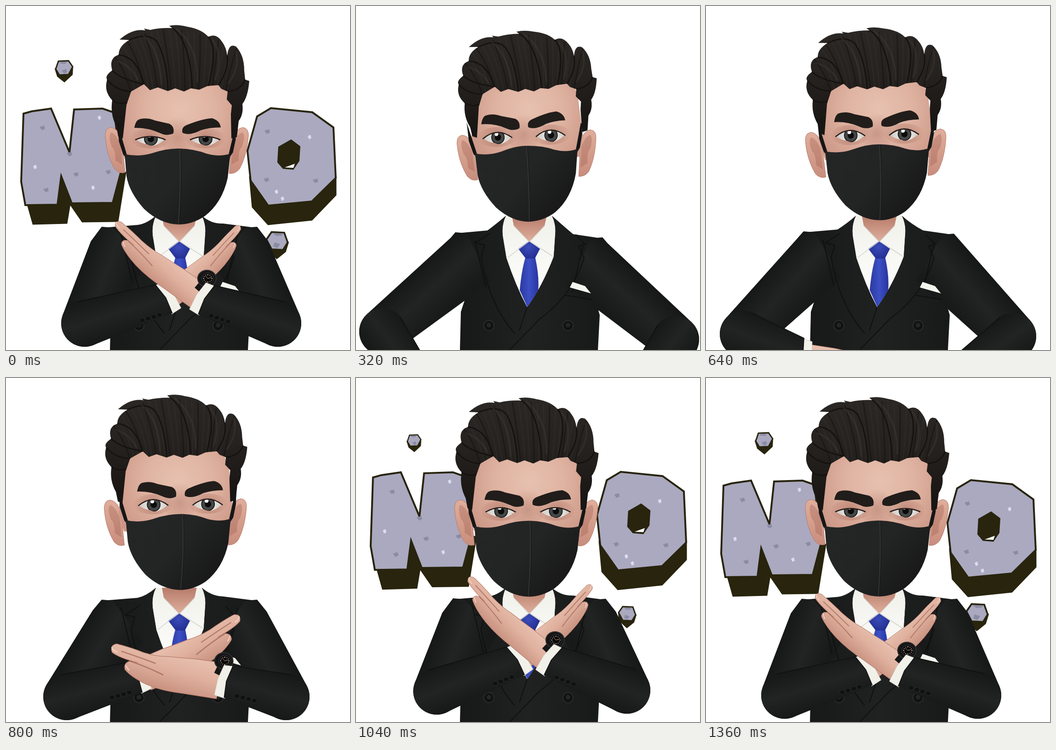
Write an HTML page with a canvas that moves like this. It is 748 by 748 pixels and loops after 1.44 s.

```html
<!DOCTYPE html>
<html lang="en">
<head>
<meta charset="utf-8">
<title>No</title>
<style>
html, body { margin: 0; width: 100%; height: 100%; overflow: hidden; background: #fff; }
canvas { display: block; width: 100vw; height: 100vh; }
</style>
</head>
<body>
<canvas id="stage" width="748" height="748"></canvas>
<script>
const ctx = document.getElementById('stage').getContext('2d');
const FRAME = 80, FRAMES = 18;
const STONE = '#aaa9c0', EARTH = '#28240d', CLOTH = '#1b1c1c', SEAM = '#0f1010';

// Arms: shoulder, elbow, wrist, fingertip, hand width.
// Head: dx, tilt, ear dy, face dx, face dy, hair dy, hair scale, eye opening, brow dy.
const hips = {
  left: [240, 542, 58, 708, 150, 825, 380, 830, 1],
  right: [512, 553, 695, 725, 605, 840, 340, 840, 1],
  head: [0, -2.4, 11, -8, -6, 1, .92, 1, -6]
};
const lift = {
  left: [236, 540, 81, 713, 208, 758, 440, 770, 1],
  right: [515, 545, 667, 718, 545, 800, 300, 800, 1],
  head: [-2, -1.5, 7, 1, -9, -4, .935, 1, -6]
};
const cross = {
  left: [232, 532, 132, 693, 284, 650, 507, 518, 1.2],
  right: [522, 532, 609, 693, 482, 660, 230, 585, 1.3],
  head: [-3, -.6, 0, 9, -14, -12, .95, 1, -5]
};
const raise = {
  left: [238, 528, 180, 672, 352, 592, 515, 422, 1],
  right: [516, 530, 587, 668, 420, 592, 252, 397, 1],
  head: [-3, 0, 1, 4, -1, -2, .985, .9, -1]
};
const rest = {
  left: [232, 530, 171, 690, 345, 636, 508, 478, 1],
  right: [522, 530, 591, 690, 434, 638, 240, 470, 1],
  head: [0, 0, 0, 0, 0, 0, 1, .35, 0]
};
const low = { ...rest, head: [0, 0, 1, 0, 2, 2, 1, .3, 0] };
const poseKeys = [[1, hips], [6, hips], [8, lift], [10, cross], [12, raise], [14, low], [15, low], [17, rest]];

const lerp = (a, b, k) => a + (b - a) * k;

function between(keys, f, mix) {
  let i = 0;
  while (i < keys.length - 2 && f > keys[i + 1][0]) i++;
  const [t0, a] = keys[i], [t1, b] = keys[i + 1];
  return mix(a, b, Math.max(0, Math.min(1, (f - t0) / (t1 - t0))));
}

function mixPose(a, b, k) {
  const pose = {};
  for (const part in a) pose[part] = a[part].map((v, i) => lerp(v, b[part][i], k));
  return pose;
}

function shape(d, fill, stroke, width = 1.5) {
  const path = d instanceof Path2D ? d : new Path2D(d);
  if (fill) { ctx.fillStyle = fill; ctx.fill(path); }
  if (stroke) { ctx.strokeStyle = stroke; ctx.lineWidth = width; ctx.stroke(path); }
}

const poly = (...pts) => 'M' + pts.map(p => p.join()).join('L') + 'Z';

function oval(x, y, rx, ry, fill, stroke, width) {
  const path = new Path2D();
  path.ellipse(x, y, rx, ry, 0, 0, 7);
  shape(path, fill, stroke, width);
}

function withStops(g, colors) {
  colors.forEach((c, i) => g.addColorStop(i / (colors.length - 1), c));
  return g;
}

const linear = (x0, y0, x1, y1, ...colors) => withStops(ctx.createLinearGradient(x0, y0, x1, y1), colors);
const radial = (x, y, r, ...colors) => withStops(ctx.createRadialGradient(x, y, 0, x, y, r), colors);

function group(draw) { ctx.save(); draw(); ctx.restore(); }

function placed(cx, cy, dx, dy, angle, sx, sy, draw) {
  group(() => {
    ctx.translate(cx + dx, cy + dy);
    ctx.rotate(angle * Math.PI / 180);
    ctx.scale(sx, sy);
    ctx.translate(-cx, -cy);
    draw();
  });
}

function chip(x, y, light) {
  const w = light ? 4 : 6;
  shape(poly([x - w, y - 2], [x + w - 2, y - 5], [x + w, y + 2], [x - 1, y + 5]), light ? '#dcdcee' : '#8b8ba2');
}

function letterN() {
  shape('M33 382L59 474L132 472L139 430L166 469L243 468L260 362L120 340Z', EARTH, EARTH, 3);
  shape('M38 234L56 229L98 223L138 318L148 225L210 223L236 232L250 360L232 428L143 429L120 370L112 432L42 433L33 382Z', STONE, EARTH, 4);
  [[79, 265], [203, 243, 1], [138, 322], [63, 350, 1], [152, 366], [222, 361], [87, 400], [189, 395, 1]].forEach(c => chip(...c));
}

function letterO() {
  shape('M530 372L536 437L570 475L665 465L717 411L717 372Z', EARTH, EARTH, 3);
  shape('M546 240L576 222L666 231L712 264L717 374L665 425L570 434L532 380L525 315Z', STONE, EARTH, 4);
  shape('M620 290L640 305L638 337L625 356L602 354L590 340L592 306Z', EARTH);
  shape('M606 351L628 343L625 352Z', '#fff');
  [[568, 273], [660, 285, 1], [566, 378], [673, 380], [588, 404, 1], [601, 419, 1]].forEach(c => chip(...c));
}

function rock(x, y, s, flip) {
  placed(0, 0, x, y, 0, s * flip, s, () => {
    shape('M-19-4L-14 12L1 24L18 8L19-8Z', EARTH, EARTH, 2);
    shape('M-12-21L10-22L19-9L10 8L-10 9L-18-4Z', STONE, EARTH, 3);
    shape('M-10-20L8-20L2-15L-8-16Z', '#8b8ba2');
    chip(1, 1);
  });
}

function stones(f) {
  if (f < 12) return;
  const dy = between([[12, -20], [15, -10], [17, 0]], f, lerp);
  const size = between([[12, .954], [13, 1.01], [14, 1]], f, lerp);
  placed(145, 348, 0, dy, 0, size, size, letterN);
  placed(620, 348, 0, dy, 0, size, size, letterO);
  if (f < 13) return;
  const s = between([[13, .8], [14, 1.2], [15, 1.15], [17, 1]], f, lerp);
  rock(126, 141, s, 1);
  rock(590, 519, s * 1.25, -1);
}

function torso([lx, ly], [rx, ry]) {
  shape(`M326 456Q305 474 286 ${ly - 54}L${lx - 20} ${ly - 48}L246 610L228 665L226 748H526L530 672L512 610L${rx + 20} ${ry - 48}L472 ${ry - 57}Q446 474 426 456Z`,
    linear(226, 0, 528, 0, '#171818', '#202121', '#181919'));
}

// Shirt and tie show through the opening between the lapels.
function front() {
  const opening = new Path2D('M326 456Q316 476 319 500L327 548Q347 608 372 655Q405 610 430 545L433 500Q436 476 426 456Z');
  group(() => {
    ctx.clip(opening);
    shape(opening, linear(0, 460, 0, 650, '#f1f1eb', '#fff'));
    shape('M338 450H416L410 478L376 513L343 478Z', linear(0, 460, 0, 513, '#b97e6d', '#e0b09e'));
    shape('M368 548H390Q399 590 396 620L373 656L356 618Q360 575 368 548Z', linear(356, 0, 397, 0, '#2b3aa0', '#3c4fc4', '#2734a0'));
    shape('M353 528L376 511L400 528L389 549H369Z', radial(375, 524, 30, '#3c4cba', '#202c8c'));
    shape('M330 547L376 512L343 478M429 545L378 512L410 478', null, '#d3d3cb');
  });
  shape('M292 494L260 515L280 520L272 546Q290 650 345 712M478 497L498 518L484 522L496 548Q470 630 400 680L334 748M372 655L355 706', null, SEAM, 2);
  for (const x of [289, 461]) {
    oval(x, 695, 11, 11, '#111', '#303131');
    oval(x, 694, 5, 5, '#242525');
  }
  shape('M455 629L512 638', null, SEAM, 2);
  shape('M465 612L471 600L498 609L511 625Z', '#f5f5ef');
}

function ear(d, inner) {
  shape(d, linear(0, 264, 0, 365, '#e0ae9c', '#c88d7c'), '#b57c6c', 1);
  shape(inner, 'rgba(148,84,72,.3)');
}

const HAIR = new Path2D('M247 73Q275 48 303 53L300 49L314 52Q335 47 362 48L355 43Q372 39 394 45Q425 50 440 67Q457 58 470 78Q479 90 481 108Q484 80 500 88Q518 107 518 140L520 160L529 163Q526 198 514 213Q517 235 506 250L502 285L490 288L489 235L491 216L480 203L482 186L468 180L462 172L438 174L420 182L402 179L387 186L368 179L352 185L330 177L313 183L300 170L272 186L262 215L254 288L244 284L240 262Q226 235 231 205Q212 185 220 160Q214 152 231 140Q223 113 245 106Q245 87 268 74Z');

function hair() {
  shape(HAIR, linear(0, 42, 0, 260, '#2b2724', '#26221f', '#191614'));
  ctx.clip(HAIR);
  ctx.lineCap = 'round';
  for (let i = 0; i < 22; i++) {
    const u = i / 21, x = 270 + u * 208, top = 92 - 40 * Math.sin(Math.PI * u);
    const strand = `M${x} 182Q${x - 14 + u * 26} ${130 - 16 * Math.sin(u * 9)} ${x - 48 + u * 72} ${top}`;
    shape(strand, null, i % 3 ? 'rgba(66,59,54,.22)' : 'rgba(18,16,14,.5)', 3);
  }
  shape('M268 74Q310 55 330 80Q350 120 352 182M245 106Q285 110 300 170M231 140Q250 160 300 170M220 160Q240 185 272 186M357 45Q400 70 405 178M440 67Q462 95 440 174M481 108Q484 140 462 172M520 160Q510 185 480 186M231 205Q245 215 262 210', null, '#151210', 3);
  shape('M300 65Q336 100 338 170M372 50Q418 90 416 165M450 75Q473 105 455 160M500 98Q510 130 484 168M242 120Q272 130 286 160', null, 'rgba(76,68,62,.3)', 4);
}

function eye(x, open) {
  const up = lerp(-6, -24, open);
  const lid = new Path2D(`M${x - 32} 290Q${x} ${290 + up} ${x + 32} 290Q${x + 8} 310 ${x - 6} 301Q${x - 22} 299 ${x - 32} 290Z`);
  oval(x, 288, 44, 22, radial(x, 288, 44, 'rgba(150,84,70,.45)', 'rgba(150,84,70,0)'));
  group(() => {
    ctx.clip(lid);
    shape(lid, linear(x - 32, 0, x + 32, 0, '#c9c6c1', '#f6f5f1', '#d0cdc8'));
    oval(x + 1, 289, 14, 14, '#454746', '#1c1d1d', 2);
    oval(x + 1, 289, 7, 7, '#0b0b0b');
    oval(x - 2, 282, 4, 4, '#fff');
  });
  shape(`M${x - 33} 291Q${x} ${289 + up} ${x + 33} 291`, null, '#251b18', 2.5);
}

function mask(fx) {
  const top = 378 + fx * .5, chin = 375 + fx * .2;
  shape('M245 268L263 330L256 322L247 294ZM499 266L484 330L492 318L498 290Z', '#161616', '#161616', 3);
  shape(`M258 322Q288 329 318 320Q350 309 ${top} 310Q410 311 436 321Q464 329 488 321L482 374Q470 428 432 457Q405 475 ${chin} 475Q335 474 300 441Q268 405 262 370Z`,
    linear(258, 320, 440, 480, '#242525', '#232424', '#171717'));
  shape(`M${top} 311Q${top + 3} 390 ${chin} 474`, null, '#343535', 2);
  shape(`M${top + 2} 311Q${top + 5} 390 ${chin + 2} 474`, null, '#151515', 1);
}

function face(fx, fy, open, brow) {
  group(() => {
    ctx.translate(fx, fy);
    oval(372, 286, 34, 45, radial(372, 286, 45, 'rgba(158,92,78,.35)', 'rgba(158,92,78,0)'));
    eye(314, open);
    eye(433, open);
    ctx.translate(0, brow);
    shape('M279 265Q282 248 291 246Q307 242 324 249L355 256Q367 262 364 277Q350 284 334 276Q308 264 279 265Z', '#211d1b');
    shape('M384 276Q380 263 395 258Q428 245 448 244Q465 249 467 264Q442 264 424 270Q399 283 384 276Z', '#211d1b');
  });
  group(() => {
    ctx.translate(fx * .5, fy);
    mask(fx);
  });
}

function head([dx, tilt, earY, fx, fy, hairY, hairScale, open, brow]) {
  // The turned head looks slightly narrower.
  const narrow = 1 - .012 * Math.abs(tilt);
  ctx.translate(dx, 0);
  placed(372, 300, 0, earY, tilt, narrow, 1, () => {
    ear('M252 290Q243 265 228 264Q214 266 216 287Q219 325 236 354Q246 366 259 362Z', 'M249 300Q238 276 228 275Q222 284 230 306Q238 312 238 336L253 345Z');
    ear('M492 290Q500 266 515 264Q529 266 527 285Q523 327 508 354Q498 366 485 364Z', 'M494 300Q504 276 515 275Q521 284 513 306Q505 312 506 336L490 345Z');
  });
  placed(372, 300, 0, 0, tilt, narrow, 1, () => {
    shape('M275 145H472L490 200L498 290L488 332L380 345L258 332L247 290L258 200Z', radial(380, 225, 150, '#e7c1b0', '#dfb3a1', '#cc9787'));
  });
  placed(372, 180, 0, hairY, tilt * 1.3, narrow, hairScale, hair);
  placed(372, 290, 0, 0, tilt, narrow, 1, () => face(fx, fy, open, brow));
}

function unit(ax, ay, bx, by) {
  const d = Math.hypot(bx - ax, by - ay) || 1;
  return [(bx - ax) / d, (by - ay) / d];
}

function hand(x, y, tx, ty, width, flip) {
  const len = Math.hypot(tx - x, ty - y) / 236;
  placed(0, 0, x, y, Math.atan2(ty - y, tx - x) * 180 / Math.PI, len, len * width * flip, () => {
    shape('M0-31L69-38Q110-44 144-41Q180-37 197-28Q204-19 192-13L176-12Q215-13 232-8Q242 2 228 7Q200 8 170 6Q140 6 120 11Q85 16 63 20L0 27Z',
      linear(0, 26, 0, -42, '#e9c2b1', '#dfb09d', '#c99281'), '#b67e6d', 1);
    shape('M192-13Q155-14 118-19M215-2Q175-3 140-5', null, 'rgba(150,88,74,.6)', 2);
    shape('M222-5Q233-5 236 0M188-27Q196-24 198-21', null, '#f0d0c2', 2);
  });
}

function watch(x, y, [nx, ny], [px, py]) {
  shape(`M${x} ${y}L${x - px * 32 + nx * 6} ${y - py * 32 + ny * 6}`, null, '#171717', 15);
  oval(x, y, 20, 18, '#151515', '#303030', 2);
  oval(x + 2, y, 13, 12, '#090909', '#444', 1);
  for (let i = 0; i < 12; i++) {
    const a = i * Math.PI / 6;
    oval(x + 2 + 9 * Math.cos(a), y + 8 * Math.sin(a), 1.1, 1.1, i % 3 ? '#b08c76' : '#ddd');
  }
  shape(`M${x - 3} ${y - 5}L${x + 2} ${y}L${x + 9} ${y - 2}`, null, '#c5a28c', 1);
}

function upperArm([sx, sy, ex, ey], side) {
  const [ux, uy] = unit(sx, sy, ex, ey), ox = side * uy, oy = -side * ux;
  const at = (x, y, r) => [x + ox * r, y + oy * r];
  const fill = linear(...at(ex, ey, 52), ...at(ex, ey, -60), '#161717', '#222323', '#181919');
  oval(ex, ey, 51, 51, CLOTH);
  shape(poly(at(sx, sy, -78), [sx, sy - 48], [sx + side * 24, sy - 50], at(sx, sy, 51), at(ex, ey, 51), at(ex, ey, -51)), fill);
  shape(`M${sx - side * 18} ${sy - 32}Q${sx - side * 30} ${sy + 15} ${sx - side * 42} ${sy + 70}`, null, SEAM, 2);
}

function foreArm([, , ex, ey, wx, wy, tx, ty, width], side) {
  const f = unit(ex, ey, wx, wy), h = unit(wx, wy, tx, ty);
  const n = unit(0, 0, f[0] + h[0], f[1] + h[1]);
  const up = [-n[1] * side, n[0] * side], g = [-f[1] * side, f[0] * side];
  const wrist = (along, across) => [wx + n[0] * along + up[0] * across, wy + n[1] * along + up[1] * across];
  const elbow = r => [ex + g[0] * r, ey + g[1] * r];

  hand(...wrist(13, 0), tx, ty, width, side);
  if (side > 0) watch(...wrist(20, 41), n, up);
  shape(poly(wrist(-4, 35), wrist(17, 32), wrist(22, 0), wrist(20, -36), wrist(-4, -37)), '#f1f1ea', '#d0d0c8', 1);
  const sleeve = linear(...elbow(52), ...elbow(-52), '#161717', '#222323', '#161717');
  oval(ex, ey, 51, 51, sleeve);
  shape(poly(elbow(51), wrist(-2, 36), wrist(3, 0), wrist(-2, -36), elbow(-51)), sleeve);
  shape(`M${elbow(49)}L${wrist(-2, 36)}L${wrist(3, 0)}L${wrist(-2, -36)}`, null, SEAM, 1.5);
  const [bx, by] = wrist(-28, -25);
  for (let i = 0; i < 4; i++) oval(bx - f[0] * i * 13, by - f[1] * i * 13, 6, 5, '#101111', '#2c2d2d', 1);
}

function render(f) {
  const { left, right, head: pose } = between(poseKeys, f, mixPose);
  ctx.fillStyle = '#fff';
  ctx.fillRect(0, 0, 748, 748);
  stones(f);
  torso(left, right);
  upperArm(left, -1);
  upperArm(right, 1);
  front();
  group(() => head(pose));
  foreArm(left, -1);
  foreArm(right, 1);
}

function tick() {
  const step = Math.floor(performance.now() / FRAME) % FRAMES;
  render(step || FRAMES);
  requestAnimationFrame(tick);
}
tick();
</script>
</body>
</html>
```
